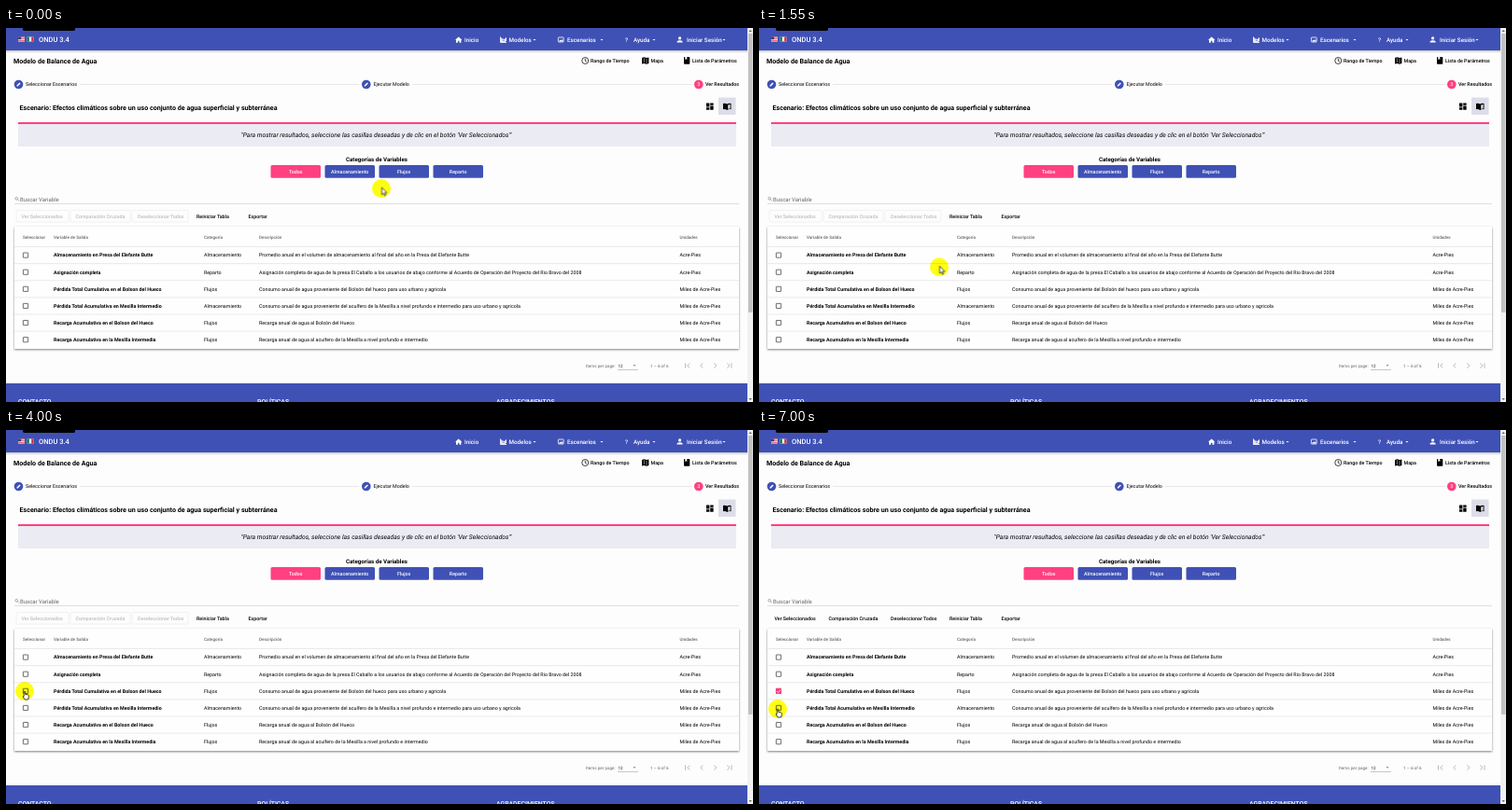
Animation, 800 px wide and 401 px high, one loop 8 s. Source, as an HTML page:

```html
<!DOCTYPE html>
<html lang="es">
<head>
<meta charset="utf-8">
<title>Modelo de Balance de Agua</title>
<style>
html, body { margin: 0; width: 100%; height: 100%; overflow: hidden; background: #fdfdfd; }
svg { display: block; width: 100vw; height: 100vh; }
text { font: 5.32px Roboto, sans-serif; text-rendering: geometricPrecision; white-space: pre; fill: #000; }
.medium { font-weight: 500; }
.bold { font-weight: 700; }
.title { font-size: 7.15px; font-weight: 700; }
.brand { font-size: 7.5px; font-weight: 500; }
.nav { font-size: 6.25px; }
.footer { font-size: 6.9px; font-weight: 500; }
.light text, text.light { fill: #fff; }
.small { font-size: 4.6px; fill: #666; }
.mid { text-anchor: middle; }
.line { fill: none; stroke: #111; stroke-width: .8; }

#pointer, #pointer > g, #click, #checked, .enabled, .disabled { animation: 8s -5ms infinite; }
#pointer { animation-name: move; }
#halo { fill: #ffff14; mix-blend-mode: multiply; animation: move 8s -5ms infinite; }
#pointer > .arrow { animation-name: arrow; animation-timing-function: step-end; }
#pointer > .beam { animation-name: beam; animation-timing-function: step-end; }
#pointer > .hand { animation-name: hand; animation-timing-function: step-end; }
#click { animation-name: ring; animation-timing-function: linear; transform-origin: 20.4px 280px; }
#checked, .enabled { animation-name: turn-on; animation-timing-function: step-end; }
.disabled { animation-name: turn-off; animation-timing-function: step-end; }

@keyframes move {
  0% { transform: translate(402px, 172px); }
  1.25% { transform: translate(402px, 172px); animation-timing-function: steps(4); }
  3.75% { transform: translate(399px, 170px); animation-timing-function: steps(3); }
  5.625% { transform: translate(401px, 178px); animation-timing-function: steps(3); }
  7.5% { transform: translate(406px, 176px); }
  11.875% { transform: translate(406px, 176px); animation-timing-function: steps(5); }
  15% { transform: translate(307px, 219px); animation-timing-function: steps(5); }
  18.125% { transform: translate(212px, 253px); animation-timing-function: steps(6); }
  21.875% { transform: translate(155px, 263px); }
  25.625% { transform: translate(155px, 263px); animation-timing-function: steps(1); }
  26.25% { transform: translate(147px, 253.5px); animation-timing-function: steps(3); }
  28.125% { transform: translate(135px, 248px); animation-timing-function: steps(7); }
  32.5% { transform: translate(98px, 272px); }
  34.375% { transform: translate(98px, 272px); animation-timing-function: steps(1); }
  35% { transform: translate(69px, 281px); animation-timing-function: steps(6); }
  38.75% { transform: translate(37px, 283px); animation-timing-function: steps(9); }
  44.375% { transform: translate(20px, 281px); }
  49.375% { transform: translate(20px, 281px); animation-timing-function: steps(1); }
  50% { transform: translate(20px, 280px); }
  71.25% { transform: translate(20px, 280px); animation-timing-function: steps(6); }
  75% { transform: translate(25.3px, 287.7px); animation-timing-function: steps(2); }
  76.25% { transform: translate(24px, 292px); animation-timing-function: steps(8); }
  81.25% { transform: translate(17px, 300px); }
  83.125% { transform: translate(17px, 300px); animation-timing-function: steps(7); }
  87.5%, 100% { transform: translate(20px, 299px); }
}
@keyframes arrow {
  0%, 38.125%, 73.125% { opacity: 1; }
  35%, 42.5%, 79.375%, 100% { opacity: 0; }
}
@keyframes beam { 0%, 38.125%, 100% { opacity: 0; } 35% { opacity: 1; } }
@keyframes hand { 0%, 73.125% { opacity: 0; } 42.5%, 79.375%, 100% { opacity: 1; } }
@keyframes ring {
  0%, 66.24% { transform: scale(0); opacity: 0; }
  66.25% { transform: scale(0); opacity: 1; }
  75% { transform: scale(.7); opacity: 1; }
  78.75% { transform: scale(1); opacity: 0; }
  100% { transform: scale(1); opacity: 0; }
}
@keyframes turn-on { 0% { opacity: 0; } 67.5%, 100% { opacity: 1; } }
@keyframes turn-off { 0% { opacity: 1; } 67.5%, 100% { opacity: 0; } }
</style>
</head>
<body>
<svg viewBox="0 0 800 401" preserveAspectRatio="none">
  <defs>
    <filter id="shadow" x="-5%" y="-5%" width="110%" height="115%">
      <feDropShadow dx="0" dy="1" stdDeviation="1.2" flood-opacity=".5"/>
    </filter>
    <linearGradient id="header-shade" x2="0" y2="1">
      <stop stop-color="#000" stop-opacity=".22"/>
      <stop offset="1" stop-color="#000" stop-opacity="0"/>
    </linearGradient>
    <g id="pencil">
      <circle r="4.8" fill="#3f51b5"/>
      <path d="M-2 2v-1.1L1-2.1l1.1 1.1L-.9 2z" fill="#fff"/>
    </g>
    <path id="caret" d="M-1.5-.7h3L0 .8z"/>
  </defs>
  <rect width="800" height="401" fill="#fdfdfd"/>

  <rect y="24" width="794" height="3" fill="url(#header-shade)"/>
  <g class="light" fill="#fff">
    <rect width="794" height="24" fill="#3f51b5"/>
    <path d="M18 0h56v1.5q0 1.5-2 1.5H20q-2 0-2-1.5z" fill="#000"/>
    <rect x="13" y="9.5" width="7" height="5"/>
    <path d="M13 10h7M13 11.7h7M13 13.4h7" stroke="#d3354a" stroke-width=".8"/>
    <rect x="13" y="9.5" width="3.2" height="2.7" fill="#31407c"/>
    <rect x="22.5" y="9.5" width="7" height="5"/>
    <rect x="22.5" y="9.5" width="2.3" height="5" fill="#14724a"/>
    <rect x="27.2" y="9.5" width="2.3" height="5" fill="#d02f3f"/>
    <text class="brand" x="35" y="15">ONDU 3.4</text>
    <path d="M481 12.7l3.7-3.3 3.7 3.3h-1v3h-1.9v-2h-1.6v2h-1.9v-3z"/>
    <path d="M529.5 9.5v6h6.5M531 14l1.5-2.2 1.3 1 1.7-2.3V14z" stroke="#fff" stroke-width=".8" fill-opacity=".8"/>
    <rect x="591.4" y="10" width="5.8" height="5" rx=".6" fill="none" stroke="#fff" stroke-width=".8"/>
    <path d="M592 14.5l1.5-2 1 1 1-1.5 1.4 2.5z"/>
    <circle cx="721.6" cy="10.9" r="1.6"/>
    <path d="M718.5 15.5q0-2.3 3.1-2.3t3.1 2.3z"/>
    <g class="nav-labels"></g>
  </g>

  <text class="title" x="8" y="37.7">Modelo de Balance de Agua</text>
  <g class="line">
    <circle cx="620.3" cy="35" r="3.5"/>
    <path d="M620.3 32.7v2.5l1.7 1"/>
  </g>
  <path d="M681 32l2.4-.7 2.6.8 2.4-.7v6.5l-2.4.8-2.6-.8-2.4.7z"/>
  <path d="M683.4 32.2v5M686 32.8v5" stroke="#fff" stroke-width=".5"/>
  <rect x="726" y="31" width="6.3" height="7.8" rx=".8"/>
  <path d="M727.3 31h2v3l-1-.7-1 .7z" fill="#fff"/>
  <text class="medium" x="626" y="37">Rango de Tiempo</text>
  <text class="medium" x="690.5" y="37">Mapa</text>
  <text class="medium" x="735" y="37">Lista de Parámetros</text>

  <path d="M79 60.5h299M435 60.5h300" stroke="#dedede" stroke-width=".7"/>
  <use href="#pencil" x="13.5" y="60.5"/>
  <use href="#pencil" x="385.8" y="60.5"/>
  <circle cx="741.8" cy="60.5" r="4.8" fill="#ff4081"/>
  <text class="light mid" x="741.8" y="62.4">3</text>
  <text x="21" y="62.4">Seleccionar Escenarios</text>
  <text x="393.5" y="62.4">Ejecutar Modelo</text>
  <text class="medium" x="749" y="62.4">Ver Resultados</text>

  <text class="title" x="14.5" y="87.8">Escenario: Efectos climáticos sobre un uso conjunto de agua superficial y subterránea</text>
  <path d="M750 80.5h3.4v4h-3.4zM754.2 80.5h3.4v2.3h-3.4zM750 85.3h3.4v2.4h-3.4zM754.2 83.6h3.4v4.1h-3.4z"/>
  <rect x="763" y="74.5" width="18.5" height="18.5" fill="#dcdde8"/>
  <path d="M768 81q2.2-.7 4.2.5 2-1.2 4.3-.5v6.3q-2.3-.6-4.3.6-2-1.2-4.2-.6z"/>
  <path d="M773.2 82.5q1.2-.7 2.4-.5v4.4q-1.3-.1-2.4.4z" fill="#dcdde8"/>
  <rect x="13" y="103" width="769" height="24" fill="#ebebf3"/>
  <rect x="13" y="101" width="769" height="2" fill="#ff4081"/>
  <text class="mid" x="396.5" y="116.8" style="font-size:6.78px;font-style:italic">"Para mostrar resultados, seleccione las casillas deseadas y de clic en el botón 'Ver Seleccionados'"</text>

  <text class="mid bold" x="397" y="143" style="font-size:6.17px">Categorías de Variables</text>
  <g id="categories" class="light"></g>

  <g class="line" style="stroke:#777;stroke-width:.6">
    <circle cx="11.3" cy="182.8" r="1.4"/>
    <path d="M12.3 183.8l1.7 1.7"/>
  </g>
  <text x="15" y="186" style="font-size:6px;fill:#666">Buscar Variable</text>
  <path d="M9 188.5h776" stroke="#ccc" stroke-width=".6"/>
  <g id="toolbar"></g>

  <rect x="9" y="213" width="776" height="131" fill="#fefefe" filter="url(#shadow)"/>
  <g id="table"></g>
  <g id="checked">
    <rect x="18" y="277.1" width="6" height="6" rx=".6" fill="#ff4081"/>
    <path d="M19.1 280.1l1.4 1.4 2.6-2.8" fill="none" stroke="#fff" stroke-width=".8"/>
  </g>

  <g fill="none" stroke="#aaa" stroke-width=".8">
    <path d="M655 366.4h22" stroke="#888" stroke-width=".5"/>
    <path d="M727.5 359.3v5.4M732.3 359.5l-2.6 2.5 2.6 2.5M746.3 359.5l-2.6 2.5 2.6 2.5M758.3 359.5l2.6 2.5-2.6 2.5M772.3 359.5l2.6 2.5-2.6 2.5M777 359.3v5.4"/>
  </g>
  <use href="#caret" x="673" y="362" fill="#777"/>
  <text class="small" x="621" y="363.7">Items per page:</text>
  <text class="small" x="655.5" y="363.7" style="fill:#222">12</text>
  <text class="small" x="690" y="363.7">1 – 6 of 6</text>

  <g class="light">
    <rect y="381" width="794" height="20" fill="#3f51b5"/>
    <text class="footer" x="13" y="403">CONTACTO</text>
    <text class="footer" x="269" y="403">POLÍTICAS</text>
    <text class="footer" x="525" y="403">AGRADECIMIENTOS</text>
  </g>
  <rect x="794" width="6" height="401" fill="#f1f1f1"/>
  <rect x="795" y="6" width="4.5" height="299" fill="#c1c1c1"/>
  <path d="M795.5 4l1.7-2 1.7 2zM795.5 397l1.7 2 1.7-2z" fill="#666"/>

  <circle id="click" cx="20.4" cy="280" r="9.3" fill="#fff" fill-opacity=".4" stroke="#f5415d" stroke-width="1.7"/>
  <circle id="halo" r="10"/>
  <g id="pointer">
    <g class="arrow"><path transform="translate(.2 -.6) scale(.92)" d="M.3-.5v8.4l1.9-1.7 1.3 3 1.4-.6-1.3-2.9h2.6z" fill="#fff" stroke="#111" stroke-width=".75"/></g>
    <g class="beam"><path d="M-1.7-3.4h3.4M-1.7 3.4h3.4M0-3.4v6.8" fill="none" stroke="#111" stroke-width=".9"/></g>
    <g class="hand"><path d="M-.8.4q.8-.7 1.5.1v2.8l3 .7q.9.4.7 1.4l-.7 3.6H.2l-2-3q-.1-1 1-.5z" fill="#fff" stroke="#111" stroke-width=".8"/></g>
  </g>
</svg>
<script>
const fill = (selector, parts) => { document.querySelector(selector).innerHTML = parts.join(''); };
const label = (x, y, text, cls = '', style = '') =>
  `<text x="${x}" y="${y}" class="${cls}" style="${style}">${text}</text>`;

fill('.nav-labels', [
  [491, 'Inicio'], [538.5, 'Modelos', 566], [601, 'Escenarios', 638], [663, '?'],
  [672, 'Ayuda', 694], [729, 'Iniciar Sesión', 769]
].map(([x, text, caret]) => label(x, 14.8, text, 'nav medium') +
  (caret ? `<use href="#caret" x="${caret}" y="12.8"/>` : '')));

fill('#categories', ['Todos', 'Almacenamiento', 'Flujos', 'Reparto'].map((name, i) => {
  const x = 283.5 + i * 58;
  return `<rect x="${x}" y="147" width="53.5" height="13.8" rx="1.6" fill="${i ? '#3f51b5' : '#ff4081'}"/>` +
    label(x + 26.7, 156, name, 'mid medium');
}));

const actions = [[16.5, 'Ver Seleccionados', 11, 56], [74.5, 'Comparación Cruzada', 69, 64],
  [141, 'Deseleccionar Todos', 135, 60], [204, 'Reiniciar Tabla'], [259.5, 'Exportar']];
fill('#toolbar', actions.map(([x, text, left, width]) => {
  const active = label(x, 203.6, text, 'medium' + (left ? ' enabled' : ''));
  if (!left) return active;
  return `<g class="disabled"><rect x="${left}" y="195.5" width="${width}" height="12.5" rx="1" fill="none" stroke="#ebebeb" stroke-width=".6"/>` +
    label(x, 203.6, text, 'medium', 'fill:#bdbdbd') + '</g>' + active;
}));

const columns = [51, 212, 271, 721.5];
const rows = [
  ['Almacenamiento en Presa del Elefante Butte', 'Almacenamiento', 'Promedio anual en el volumen de almacenamiento al final del año en la Presa del Elefante Butte', 'Acre-Pies'],
  ['Asignación completa', 'Reparto', 'Asignación completa de agua de la presa El Caballo a los usuarios de abajo conforme al Acuerdo de Operación del Proyecto del Rio Bravo del 2008', 'Acre-Pies'],
  ['Pérdida Total Cumulativa en el Bolson del Hueco', 'Flujos', 'Consumo anual de agua proveniente del Bolsón del hueco para uso urbano y agricola', 'Miles de Acre-Pies'],
  ['Pérdida Total Acumulativa en Mesilla Intermedio', 'Almacenamiento', 'Consumo anual de agua proveniente del acuífero de la Mesilla a nivel profundo e intermedio para uso urbano y agricola', 'Miles de Acre-Pies'],
  ['Recarga Acumulativa en el Bolson del Hueco', 'Flujos', 'Recarga anual de agua al Bolsón del Hueco', 'Miles de Acre-Pies'],
  ['Recarga Acumulativa en la Mesilla Intermedia', 'Flujos', 'Recarga anual de agua al acuífero de la Mesilla a nivel profundo e intermedio', 'Miles de Acre-Pies']
];
const heads = ['Variable de Salida', 'Categoría', 'Descripción', 'Unidades'];
fill('#table', [
  label(18, 225.5, 'Seleccionar', 'small medium'),
  ...heads.map((text, i) => label(columns[i], 225.5, text, 'small medium')),
  ...rows.map((cells, r) => {
    const y = 243.7 + r * 18.12;
    return `<path d="M9 ${y - 9.2}h776" stroke="#dcdcdc" stroke-width=".6"/>` +
      `<rect class="line" x="18.4" y="${y - 2.7}" width="5.2" height="5.2" rx=".3" style="stroke:#333;stroke-width:.7"/>` +
      cells.map((text, i) => label(columns[i], y + 1.7, text, i ? '' : 'bold')).join('');
  })
]);
</script>
</body>
</html>
```
